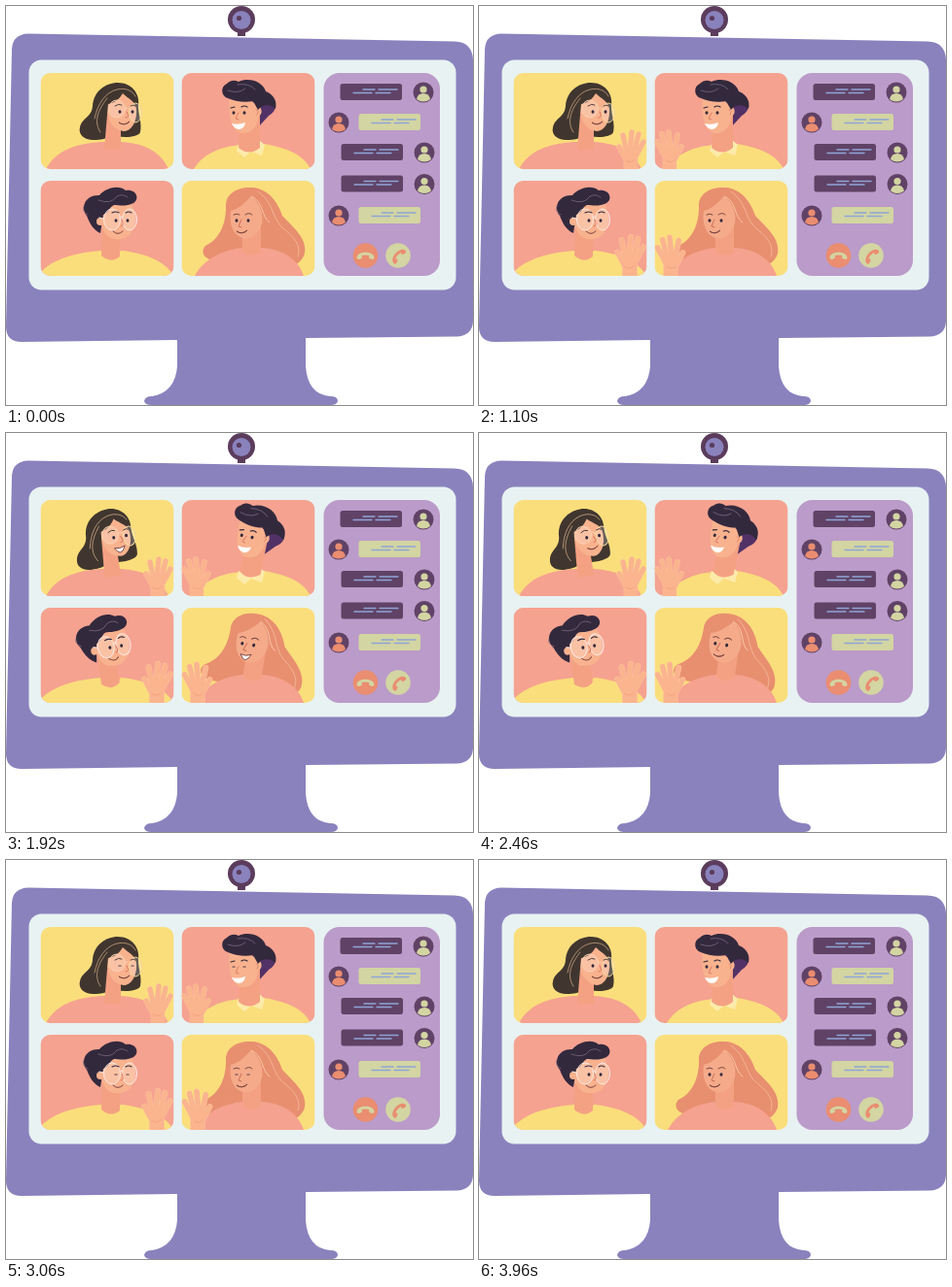
Animation, 480 px wide and 411 px high, one loop 3980 ms. Source, as an HTML page:

```html
<!DOCTYPE html>
<html lang="en">
<head>
<meta charset="utf-8">
<title>Video call</title>
<style>
html, body { margin: 0; height: 100%; overflow: hidden; background: #fff; }
svg { display: block; width: 100vw; height: 100vh; }
.line { fill: none; stroke-linecap: round; stroke-linejoin: round; }
</style>
</head>
<body>
<svg id="stage" viewBox="0 0 480 411"></svg>
<script>
const LOOP = 3980;
const C = {
  frame: '#8a82bd', screen: '#e8f2f2', yellow: '#fade7b', peach: '#f5a290', panel: '#bb9bc9',
  plum: '#604266', cam: '#5b3c5c', lime: '#d3d5a2', coral: '#ea8d70', blue: '#8fa5d6',
  ink: '#33293d', brown: '#40362f', red: '#e88f70', skin: '#f8b28e', neck: '#f4a183'
};
const stage = document.getElementById('stage');

const shape = (d, fill) => `<path d="${d}" fill="${fill}"/>`;
const line = (d, color, width = 1) => `<path class="line" d="${d}" stroke="${color}" stroke-width="${width}"/>`;
const disc = (x, y, r, fill) => `<circle cx="${x}" cy="${y}" r="${r}" fill="${fill}"/>`;
const rect = (x, y, w, h, r, fill) => `<rect x="${x}" y="${y}" width="${w}" height="${h}" rx="${r}" fill="${fill}"/>`;
const eye = (x, y) => `<ellipse class="eye" cx="${x}" cy="${y}" rx="1.5" ry="1.8" fill="${C.ink}"/>`;
const lens = (x, y, rx, ry, color) =>
  `<ellipse cx="${x}" cy="${y}" rx="${rx}" ry="${ry}" fill="#fff" fill-opacity=".2" stroke="${color}"/>`;
const mouth = (x, y, w) =>
  `<path class="mouth" data-box="${x} ${y} ${w}" fill="#fff" stroke="#79413f" stroke-width=".9" stroke-linejoin="round"/>`;
const neckline = (x, y, w) => shape(`M${x} ${y}Q${x + w / 2} ${y + 13} ${x + w} ${y}Z`, C.neck);

// Hair and face turn about their own pivots; lift raises the face as it turns.
const people = [
  {
    tile: [35.5, 69, 137, 99], back: C.yellow, pivot: [106, 146], hairPivot: [106, 146], tilt: -9.5, lift: 0,
    hand: [156, 168, 1],
    body: shape('M41 168C51 149 71 142 97 140L117 140C142 141 159 150 167 168Z', C.peach) + neckline(100, 140, 19),
    hair: shape('M89 103C90 88 102 79 115 79C129 79 138 90 136 103C136 113 140 120 138 130C136 136 117 136 109 133C104 137 97 138 90 138C80 138 74 132 76 125C78 115 88 115 89 103Z', C.brown),
    head:
      shape('M104 112L118 124L118 148H101Z', C.neck) +
      shape('M105 101C112 100 117 95 120 90C126 96 133 98 134 106C135 119 129 129 121 129C112 128 106 121 104 111Z', C.skin) +
      line('M91 116C94 101 102 89 114 86C123 84 130 87 133 93M97 130C89 118 96 105 104 95', '#d9b18c', .7) +
      lens(114, 106, 8.5, 9, '#f9cfae') + lens(133, 110, 6.5, 10, '#f4d59a') +
      line('M122 106Q124 103 127 107', '#f9cfae') +
      line('M112 103Q116 100 119 102M128 103Q131 101 133 103', C.brown, .9) +
      eye(117, 109) + eye(130, 109) +
      line('M124 109Q128 115 123 115', '#d8745f') + mouth(116, 120, 11)
  },
  {
    tile: [180.5, 69, 137, 99], back: C.peach, pivot: [249, 150], hairPivot: [249, 150], tilt: 11.5, lift: 2.5,
    hand: [196, 168, -1],
    body:
      shape('M193 168C203 151 222 145 241 143L265 142C287 146 305 152 313 168Z', C.yellow) +
      shape('M239 142L237 149L245 156L252 150L263 154L266 143L260 138Q250 148 239 142Z', '#fdebaa') +
      neckline(240, 142, 21),
    hair: shape('M252 92L270 93C280 98 279 108 270 113L259 125Z', '#523266'),
    head:
      shape('M241 120L261 112V146Q250 155 239 146Z', C.neck) +
      shape('M230 93C240 97 253 96 258 102C263 104 265 111 259 114C259 124 252 132 242 131C233 130 227 113 230 93Z', C.skin) +
      shape('M228 95C221 93 220 83 227 80C231 76 235 76 239 78C250 73 264 78 267 88C275 91 279 98 277 106C269 100 263 102 259 107L254 98C245 100 235 98 228 95Z', C.ink) +
      line('M228 87Q239 91 246 85M238 81Q250 79 256 86', '#81708a', .7) +
      line('M231 105L235 104M242 104Q245 102 248 104', C.ink, 1.2) +
      eye(234, 110) + eye(245, 110) + line('M239 110L236 116L239 117', '#dc7b66') +
      shape('M232 121Q239 123 246 120Q245 127 239 127Q234 126 232 121Z', '#fff') +
      line('M257 107Q261 107 258 112', '#dc7b66', .8)
  },
  {
    tile: [35.5, 180, 137, 98], back: C.peach, pivot: [110, 258], hairPivot: [110, 258], tilt: -9.5, lift: 0,
    hand: [155, 278, 1.06],
    body: shape('M35 278V275C48 260 73 254 98 252H119C144 255 164 263 172 278Z', C.yellow) + neckline(98, 252, 20),
    hair: '',
    head:
      shape('M99 222L117 236V258Q108 266 98 257Z', C.neck) +
      shape('M97 211C106 204 121 203 129 204C134 213 134 225 129 233C124 241 113 242 106 238C100 234 97 226 97 211Z', C.skin) +
      shape('M83 216C76 207 82 194 96 195C103 187 116 184 123 190C134 188 138 199 131 203C123 207 116 205 111 205C106 207 105 214 100 215L97 234C90 231 86 224 83 216Z', C.ink) +
      disc(97, 222, 4, C.skin) +
      line('M95 200Q108 205 114 196Q120 193 125 197M84 215Q77 211 80 206', '#806f82', .7) +
      lens(109, 220, 8.5, 11, '#fbe8e1') + lens(127, 220, 7.5, 11, '#fbe8e1') +
      line('M117 218Q119 216 120 218M100 219L96 218', '#fbe8e1') +
      line('M109 213Q113 211 116 213M123 213Q126 211 129 213', C.ink, 1.1) +
      eye(113, 221) + eye(125, 221) +
      line('M119 220Q122 227 118 227', '#d97762') + line('M110 232Q115 237 120 232', '#79413f')
  },
  {
    tile: [180.5, 180, 137, 98], back: C.yellow, pivot: [251, 257], hairPivot: [251, 235], tilt: 9, lift: 2.5,
    hand: [197, 278, -1.04],
    body: shape('M194 278C203 260 224 251 243 249H264C284 251 300 260 306 278Z', C.peach) + neckline(243, 249, 20),
    hair:
      shape('M226 207C225 194 237 186 253 187C270 188 280 203 284 216C294 227 310 239 307 255C304 264 296 269 286 269C273 262 243 263 213 262C202 260 200 252 205 247C220 240 226 224 226 207Z', C.red) +
      line('M259 191C276 203 273 220 286 230C299 240 303 249 300 258', '#f6bd9d', .8),
    head:
      shape('M243 230L262 222V254Q252 260 243 253Z', C.neck) +
      shape('M231 211C240 209 247 201 252 196C260 202 265 213 263 224C259 236 251 241 243 239C234 236 229 226 231 211Z', '#f5ab8a') +
      line('M252 196C265 201 262 217 271 223', '#f9cbab', .9) +
      line('M234 215Q237 213 240 215M246 215Q250 212 253 215', '#764540', 1) +
      eye(237, 221) + eye(249, 221) +
      line('M242 220L239 227L242 228', '#cb6d59') + mouth(237, 232, 11)
  }
];

// Fingers and palm share one outline; the size's sign mirrors the hand.
const handPath = 'M-3 1L-3 -16M3 1L3 -16M-4 -16L-8 -35M-1 -17L1 -38M3 -16L8 -36M5 -13L13 -28M-5 -10L-12 -23';
const hand =
  line(handPath, '#fbc29f', 5.6) + line('M0 2V-13', '#fbc29f', 14.6) +
  line(handPath, '#fab48e', 4.8) + line('M0 2V-13', '#fab48e', 13.8) +
  line('M-5 -9Q0 -5 4 -10', '#ee9c7e', .7);

const person = (p, i) => {
  const [x, y, w, h] = p.tile;
  return `<clipPath id="clip${i}"><rect x="${x}" y="${y}" width="${w}" height="${h}" rx="10"/></clipPath>
    <g clip-path="url(#clip${i})">${rect(x, y, w, h, 0, p.back)}
    <g class="hair">${p.hair}</g>${p.body}<g class="head">${p.head}</g><g class="hand">${hand}</g></g>`;
};

const message = (x, y, dark) => {
  const ax = dark ? x + 86 : x - 20, ay = y + 9, tone = dark ? C.lime : C.coral;
  return rect(x + .5, y, 63.5, 17, 2.5, dark ? C.plum : C.lime) +
    line(`M${x + 24} ${y + 6}h12m4 0h19M${x + 14} ${y + 9.5}h19m4 0h15`, C.blue, 1.3) +
    disc(ax, ay, 10.5, C.plum) + disc(ax, ay - 3, 3.6, tone) +
    shape(`M${ax - 7} ${ay + 7}Q${ax - 6} ${ay + 1} ${ax} ${ay + 1}T${ax + 7} ${ay + 7}Q${ax} ${ay + 12} ${ax - 7} ${ay + 7}Z`, tone);
};

const phone = (x, y, angle, back, front) => disc(x, y, 12.8, back) +
  `<g transform="translate(${x} ${y}) rotate(${angle})">` +
  shape('M-9 2C-8 -5 8 -5 9 2Q9 4 7 4L4 3Q3 2 4 0Q0 -1 -4 0Q-3 2 -4 3L-7 4Q-9 4 -9 2Z', front) + '</g>';

stage.innerHTML =
  shape('M238 24H246V31H238Z', C.cam) + disc(242, 14, 14, C.cam) +
  disc(242, 14.5, 9.5, C.frame) + disc(239.5, 12.5, 2.6, C.cam) +
  shape('M23 28.5L461 36.5Q479 37 480 55V325Q479 340 463 340.5L308 342V371Q310 400 333 402Q341 402 341 407Q340 411 334 411H149Q143 411 142 407Q143 402 150 402Q174 398 176 371V344L16 346Q0 346 0 330L6 44Q7 29 23 28.5Z', C.frame) +
  rect(23.5, 55.5, 439, 237, 13, C.screen) +
  people.map(person).join('') +
  rect(326.5, 69, 119.5, 209, 16, C.panel) +
  message(343, 80, true) + message(362, 111, false) + message(344, 142, true) +
  message(344, 174.5, true) + message(362, 207, false) +
  phone(369.5, 257, 0, C.coral, C.lime) + phone(403, 257, -48, C.lime, C.coral);

const all = name => [...stage.querySelectorAll(name)];
const hairs = all('.hair'), heads = all('.head'), hands = all('.hand'), eyes = all('.eye'), mouths = all('.mouth');

const ramp = (t, from, to) => Math.min(1, Math.max(0, (t - from) / (to - from)));
const smooth = k => k * k * (3 - 2 * k);
const settle = k => 1 - (1 - k) ** 3;
const pulse = (t, a, b, c, d) => smooth(ramp(t, a, b)) * (1 - smooth(ramp(t, c, d)));

function draw(t) {
  const tilt = pulse(t, 1220, 1660, 2660, 3040);
  const raised = settle(ramp(t, 520, 880)) * settle(1 - ramp(t, 3540, 3900));
  const shut = pulse(t, 1340, 1410, 1480, 1560) + pulse(t, 2950, 3030, 3090, 3170);
  const smile = pulse(t, 1600, 1800, 2080, 2300);

  people.forEach((p, i) => {
    const turn = p.tilt * tilt;
    hairs[i].setAttribute('transform', `translate(0 ${-p.lift * tilt / 2}) rotate(${turn} ${p.hairPivot})`);
    heads[i].setAttribute('transform', `translate(0 ${-p.lift * tilt}) rotate(${turn} ${p.pivot})`);
    const [x, y, size] = p.hand, grow = .78 + .22 * raised;
    hands[i].setAttribute('transform',
      `translate(${x} ${y + 50 * (1 - raised)}) scale(${size * grow} ${Math.abs(size)})`);
    hands[i].setAttribute('opacity', Math.min(1, raised * 1.05));
  });
  eyes.forEach(e => {
    e.setAttribute('ry', 1.8 - 1.35 * shut);
    e.setAttribute('rx', 1.5 + .9 * shut);
  });
  mouths.forEach(m => {
    const [x, y, w] = m.dataset.box.split(' ').map(Number);
    m.setAttribute('d', `M${x} ${y}Q${x + w / 2} ${y + 4 - 2 * smile} ${x + w} ${y - 1}Q${x + w / 2} ${y + 4 + 7 * smile} ${x} ${y}Z`);
  });
}

function tick() {
  draw(performance.now() % LOOP);
  requestAnimationFrame(tick);
}
tick();
</script>
</body>
</html>
```
